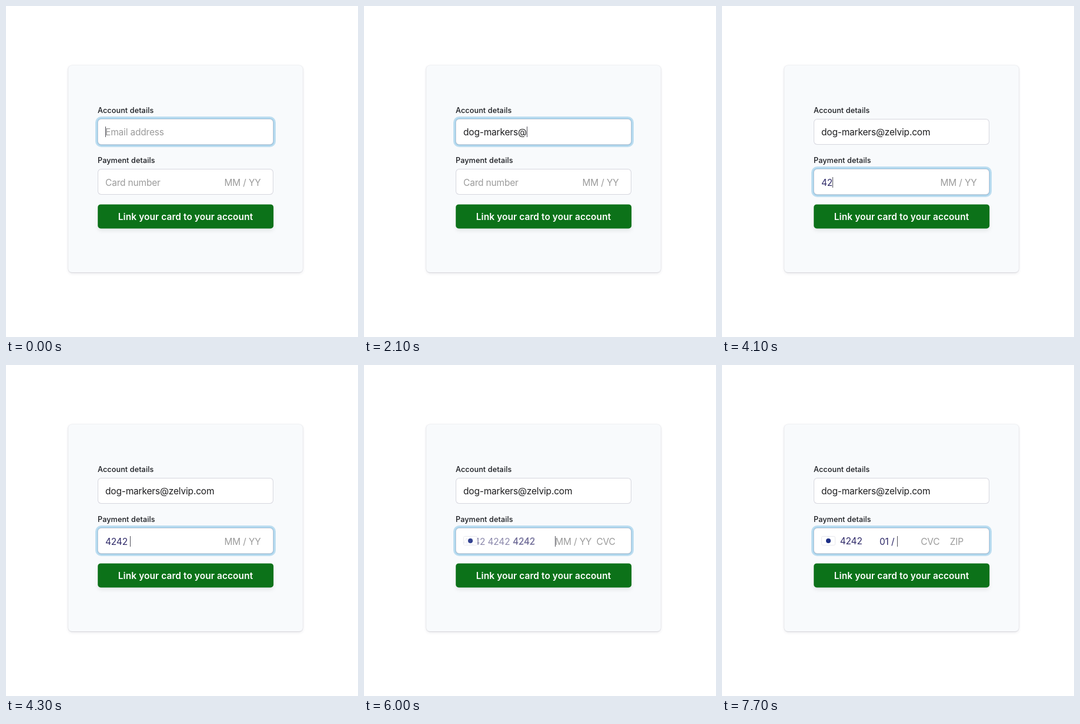
Recreate the animation shown at these times as an HTML page. Size 599 px wide and 563 px high, loop 8000 ms.

```html
<!DOCTYPE html>
<html lang="en">
<head>
<meta charset="utf-8">
<title>Link a card</title>
<style>
  html, body { margin: 0; width: 100%; height: 100%; overflow: hidden; background: #fff; }
  div, svg { position: absolute; box-sizing: border-box; }
  .panel {
    left: 106px; top: 101px; width: 399px; height: 352px; border-radius: 6px; background: #f8fafc;
    box-shadow: 0 0 0 .5px rgba(50,50,93,.1), 0 2px 5px rgba(50,50,93,.1), 0 1px 1.5px rgba(0,0,0,.07);
  }
  .field {
    --k: 0; left: 156px; width: 299px; height: 44px; border-radius: 6px;
    background: #fff; border: 1px solid rgba(50,50,93,.2);
    box-shadow: 0 0 0 calc(1px * var(--k)) rgba(50,151,211,calc(.3 * var(--k))),
      0 1px 1px rgba(0,0,0,calc(.07 * var(--k))),
      0 0 0 calc(4px * var(--k)) rgba(50,151,211,calc(.3 * var(--k)));
  }
  svg { left: 0; top: 0; }
  text { font: 15.5px Inter, Roboto, sans-serif; letter-spacing: -.18px; white-space: pre; }
  .button { fill: #0c7219; filter: drop-shadow(0 4px 3px rgba(0,0,0,.07)); }
  .label { font-size: 12.6px; font-weight: 500; letter-spacing: .12px; fill: #16181d; }
  .action { font-weight: 600; letter-spacing: .06px; fill: #fff; }
  .hint { fill: #9b9b9b; }
  .mail { fill: #1c1c1e; }
  .card { fill: #2e2968; }
</style>
</head>
<body>
<div class="panel"></div>
<div class="field" id="mailBox" style="top:192px"></div>
<div class="field" id="cardBox" style="top:277px"></div>
<svg width="599" height="563">
  <clipPath id="inside"><rect x="168" y="280" width="276" height="38"/></clipPath>
  <rect class="button" x="156.2" y="337.4" width="299" height="41.1" rx="5"/>
  <text class="label" x="156" y="181.7">Account details</text>
  <text class="label" x="156" y="266.7">Payment details</text>
  <text class="action" x="190.8" y="363.8">Link your card to your account</text>
  <text class="hint" id="mailHint" x="169" y="220">Email address</text>
  <text class="mail" id="mail" x="169" y="220" xml:space="preserve"></text>
  <g clip-path="url(#inside)">
    <text class="hint" id="cardHint" x="169" y="306">Card number</text>
    <text class="card" id="number" y="306" xml:space="preserve"></text>
    <text class="card" id="last" y="305">4242</text>
    <g id="badge">
      <rect x="169.5" y="291.5" width="23" height="15" rx="2" fill="#fff" stroke="#e6e7ec"/>
      <circle cx="181" cy="299" r="4" fill="#1d2f86"/>
    </g>
    <text class="hint" id="dateHint" y="306">MM / YY</text>
    <text class="card" id="date" y="306" xml:space="preserve"></text>
    <text class="hint" id="cvc" y="306">CVC</text>
    <text class="hint" id="zip" y="306">ZIP</text>
  </g>
  <rect id="caret" width="1" height="18" fill="#50505a"/>
</svg>
<script>
const LOOP = 8000, STEP = 100, ADDRESS = 'dog-markers@zelvip.com', DIGITS = '4242'.repeat(4);
const el = id => document.getElementById(id);
const set = (id, attrs) => { for (const a in attrs) el(id).setAttribute(a, attrs[a]); };
const ramp = (t, from, to) => Math.min(1, Math.max(0, (t - from) / (to - from)));
const every = (from, to) => Array.from({ length: (to - from) / STEP + 1 }, (_, i) => from + i * STEP);

const mailKeys = [500, 600, 800, 900, 1100, 1200, 1200, 1400, 1500, 1500, 1600, 2100, ...every(2400, 3300)];
const cardKeys = [...every(4000, 4300), ...every(4500, 5200), ...every(5400, 5600), 6000];
const typed = (text, keys, t) => text.slice(0, keys.filter(k => k <= t).length);

function caretAfter(id, y) {
  const text = el(id), x = +text.getAttribute('x') + text.getComputedTextLength();
  set('caret', { x: Math.round(x), y });
}

function draw(t) {
  const mail = typed(ADDRESS, mailKeys, t);
  const number = typed(DIGITS, cardKeys, t).replace(/\d{4}/g, '$& ');
  const date = t >= 7700 ? '01 / ' : t >= 7500 ? '0' : '';
  el('mail').textContent = mail;
  el('number').textContent = number;
  el('date').textContent = date;

  // Once the number is complete, everything slides left to its compact place.
  const rest = Math.pow(1 - ramp(t, 5900, 6500), 3.25);
  const done = t >= 6000, p = done ? 1 - rest : 0, shift = 103.5 * (1 - p);
  set('mailHint', { opacity: mail ? 0 : 1 });
  set('cardHint', { opacity: number ? 0 : 1 });
  set('number', { x: 169 - 95.7 * p, opacity: 1 - p });
  set('last', { x: 200.7 + 95.7 * (1 - p), opacity: p });
  set('badge', { opacity: Math.min(1, 2 * p) });
  set('dateHint', { x: 268 + shift, opacity: date ? 0 : 1 });
  set('date', { x: 268 + shift });
  set('cvc', { x: 338.2 + shift, opacity: done ? 1 : 0 });
  set('zip', { x: 387.7 + shift, opacity: ramp(t, 6000, 6200) });

  el('mailBox').style.setProperty('--k', 1 - ramp(t, 3450, 3600));
  el('cardBox').style.setProperty('--k', ramp(t, 3500, 3650));
  if (t < 3500) caretAfter('mail', 205);
  else caretAfter(done ? 'date' : 'number', 291);
  set('caret', { opacity: t >= 7000 && t < 7500 ? 0 : 1 });
}

const start = performance.now();
function tick() {
  const t = (performance.now() - start) % LOOP;
  draw(Math.floor(t / STEP) * STEP);
  requestAnimationFrame(tick);
}
tick();
</script>
</body>
</html>
```
